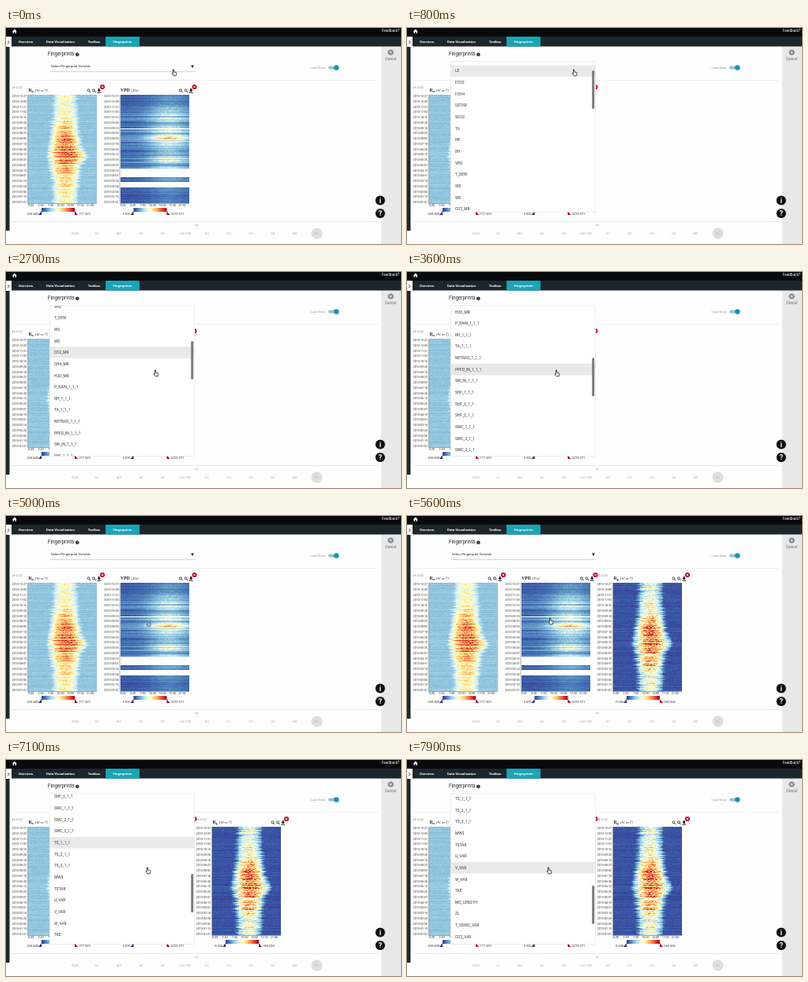
Recreate the animation shown at these times as an HTML page with a canvas. Size 500 by 275 pixels, loop 8 s.

```html
<!DOCTYPE html>
<html lang="en">
<head>
<meta charset="utf-8">
<title>Fingerprints</title>
<style>
html, body { margin: 0; width: 100%; height: 100%; overflow: hidden; background: #fff; }
canvas { display: block; width: 500px; height: 275px; }
</style>
</head>
<body>
<canvas id="stage" width="500" height="275"></canvas>
<script>
const ctx = document.getElementById('stage').getContext('2d');
const LOOP = 8000;
const SANS = 'Roboto, "Open Sans", sans-serif';
const SERIF = '"Liberation Serif", "Noto Serif", serif';
const RAMP = ['#313695', '#4575b4', '#74add1', '#abd9e9', '#e0f3f8', '#ffffbf',
  '#fee090', '#fdae61', '#f46d43', '#d73027', '#a50026'];
const ITEMS = ('LE FCO2 FCH4 USTAR SCO2 TA PR RH VPD T_DEW WS WD CO2_MR CH4_MR H2O_MR ' +
  'P_RAIN_1_1_1 RH_1_1_1 TA_1_1_1 NETRAD_1_1_1 PPFD_IN_1_1_1 SW_IN_1_1_1 ' +
  'SHF_1_1_1 SHF_2_1_1 SHF_3_1_1 SWC_1_1_1 SWC_2_1_1 SWC_3_1_1 TS_1_1_1 TS_2_1_1 TS_3_1_1 ' +
  'MWS TSTAR U_VAR V_VAR W_VAR TKE MO_LENGTH ZL T_SONIC_VAR CO2_VAR H2O_VAR CH4_VAR').split(' ');
const ROW = 14.65, LIST_TOP = 47.4;

// Drawing helpers
function rect(x, y, w, h, color) {
  ctx.fillStyle = color;
  ctx.fillRect(x, y, w, h);
}
function disc(x, y, r, color) {
  ctx.fillStyle = color;
  ctx.beginPath();
  ctx.arc(x, y, r, 0, 7);
  ctx.fill();
}
function poly(points, color) {
  ctx.fillStyle = color;
  ctx.beginPath();
  points.forEach(p => ctx.lineTo(...p));
  ctx.closePath();
  ctx.fill();
}
function line(points, color, width = 1) {
  ctx.strokeStyle = color;
  ctx.lineWidth = width;
  ctx.beginPath();
  points.forEach(([x, y], i) => i ? ctx.lineTo(x, y) : ctx.moveTo(x, y));
  ctx.stroke();
}
function text(str, x, y, size, color, align = 'left', weight = '', family = SANS) {
  ctx.font = `${weight} ${size}px ${family}`;
  ctx.textAlign = align;
  ctx.textBaseline = 'middle';
  ctx.fillStyle = color;
  ctx.fillText(str, x, y);
}
function cross(x, y, r, color, width) {
  line([[x - r, y - r], [x + r, y + r]], color, width);
  line([[x + r, y - r], [x - r, y + r]], color, width);
}

// Eased value at time t through [time, value] keys
function track(t, keys) {
  if (t <= keys[0][0]) return keys[0][1];
  for (let i = 1; i < keys.length; i++) {
    const [t0, a] = keys[i - 1], [t1, b] = keys[i];
    if (t < t1) {
      const u = (t - t0) / (t1 - t0);
      return a + (b - a) * u * u * (3 - 2 * u);
    }
  }
  return keys[keys.length - 1][1];
}

// Heatmaps
function random(seed) {
  return () => {
    seed = (seed * 1664525 + 1013904223) >>> 0;
    return seed / 4294967296;
  };
}
const bell = (x, mid, width) => Math.exp(-(((x - mid) / width) ** 2));
const rgb = RAMP.map(c => [1, 3, 5].map(i => parseInt(c.slice(i, i + 2), 16)));
function heatColor(v) {
  const p = Math.min(.999, Math.max(0, v)) * 10, i = Math.floor(p);
  return rgb[i].map((c, k) => c + (rgb[i + 1][k] - c) * (p - i));
}
function heatmap(seed, makeRow) {
  const map = document.createElement('canvas'), w = 48, h = 138;
  map.width = w;
  map.height = h;
  const g = map.getContext('2d'), image = g.createImageData(w, h), rnd = random(seed);
  for (let y = 0; y < h; y++) {
    const value = makeRow(y / h, rnd);
    for (let x = 0; x < w; x++) {
      const color = value ? heatColor(value(x / w)) : [255, 255, 255];
      image.data.set([...color, 255], (y * w + x) * 4);
    }
  }
  g.putImageData(image, 0, 0);
  return map;
}
function radiation(base, low, high) {
  return (d, rnd) => {
    const season = bell(d, .53, .28);
    const amp = (low + high * season) * (.58 + .47 * rnd());
    const mid = .53 + .03 * (rnd() - .5) + .03 * bell(d, .56, .06);
    const half = .16 + .07 * season + .05 * bell(d, .56, .06) + .05 * rnd();
    const night = base + .04 * (rnd() - .5);
    return u => night + .03 * rnd() +
      amp * Math.max(0, 1 - ((u - mid) / half) ** 2) * (.72 + .4 * rnd());
  };
}
function deficit(d, rnd) {
  if (d > .674 && d < .76 || d > .804 && d < .848 || Math.abs(d - .31) < .004) return null;
  const season = bell(d, .42, .27);
  const wave = .5 + .5 * Math.sin(d * 47 + 2 * Math.sin(d * 19));
  const night = .01 + .24 * season * (.3 + .7 * wave) * rnd() + .05 * rnd();
  const amp = .07 + season * (.2 + .4 * wave) * (.3 + .7 * rnd());
  return u => night + .03 * rnd() + amp * bell(u, .7, .29) * (.75 + .35 * rnd());
}
const CHARTS = [
  { x: 28, tag: '(1:1:1)', name: 'R', sub: 'n', unit: '[W m⁻²]', min: '-238.849', max: '717.269',
    map: heatmap(11, radiation(.24, .32, .38)) },
  { x: 144.5, tag: '', name: 'VPD', sub: '', unit: '[Pa]', min: '5.025', max: '6270.971',
    map: heatmap(5, deficit) },
  { x: 261, tag: '(1:1:1)', name: 'R', sub: 'g', unit: '[W m⁻²]', min: '0.056', max: '969.204',
    map: heatmap(29, radiation(.03, .55, .38)) }
];
const HOURS = ['0:00', '3:30', '7:00', '10:30', '14:00', '17:30', '21:00'];
const DATES = Array.from({ length: 21 }, (_, i) =>
  new Date(Date.UTC(2013, 11, 27) - i * 18 * 864e5).toISOString().slice(0, 10));

function drawChart({ x, tag, name, sub, unit, min, max, map }) {
  text(tag, x - 20, 76, 4.4, '#555', 'left', 'italic', SERIF);
  text(name, x + .5, 79.5, 5.6, '#222', 'left', 'bold', SERIF);
  const nameEnd = x + .5 + ctx.measureText(name).width;
  text(sub, nameEnd, 81, 4, '#222', 'left', 'bold', SERIF);
  text(unit, nameEnd + (sub ? 4 : 2), 79.5, 5, '#333', 'left', 'italic', SERIF);

  for (const dx of [76.5, 83]) {
    ctx.strokeStyle = '#222';
    ctx.lineWidth = .8;
    ctx.beginPath();
    ctx.arc(x + dx, 79.3, 1.5, 0, 7);
    ctx.stroke();
    line([[x + dx + 1, 80.4], [x + dx + 2.6, 82]], '#222', 1);
  }
  poly([[x + 88.8, 77], [x + 90.6, 77], [x + 90.6, 79], [x + 92, 79], [x + 89.7, 81.2],
    [x + 87.4, 79], [x + 88.8, 79]], '#111');
  rect(x + 87.4, 81.6, 4.6, 1, '#111');
  disc(x + 94, 75, 3.1, '#c3122b');
  cross(x + 94, 75, 1.1, '#fff', .8);

  ctx.imageSmoothingEnabled = false;
  ctx.drawImage(map, x, 85, 87, 138);
  line([[x - .5, 85], [x - .5, 223.5], [x + 87, 223.5]], '#555', .5);
  DATES.forEach((d, i) => text(d, x - 2, 87 + i * 6.75, 3.6, '#333', 'right'));
  HOURS.forEach((h, i) => text(h, x + 3.5 + i * 12.5, 226.2, 3.6, '#333', 'center'));

  const bar = ctx.createLinearGradient(x + 17, 0, x + 59, 0);
  RAMP.forEach((c, i) => bar.addColorStop(i / 10, c));
  rect(x + 17, 229, 42, 5, bar);
  poly([[x + 17, 233], [x + 17, 238], [x + 13, 238]], '#28327f');
  poly([[x + 59, 233], [x + 63, 238], [x + 59, 238]], '#a50026');
  text(min, x + 13, 236.5, 3.9, '#333', 'right');
  text(max, x + 64.5, 236.5, 3.9, '#333');
}

function drawFrame() {
  rect(0, 0, 500, 275, '#fefefe');
  rect(475, 23, 25, 252, '#e8e8e8');
  rect(0, 24, 4.5, 234, '#1c272d');
  rect(0, 0, 500, 11, '#07090b');
  rect(0, 11, 500, 12.5, '#1c272d');
  rect(126, 11, 43, 12.5, '#17a5b7');
  rect(0, 11, 7, 13, '#fff');
  line([[2.3, 16], [4.3, 18], [2.3, 20]], '#333', .9);
  poly([[7.8, 4.2], [10.8, 1.4], [13.8, 4.2], [13, 4.2], [13, 6.8], [11.5, 6.8], [11.5, 5],
    [10.1, 5], [10.1, 6.8], [8.6, 6.8], [8.6, 4.2]], '#fff');
  text('Feedback?', 498, 4, 4.7, '#fff', 'right');
  [['Overview', 25], ['Data Visualization', 69], ['Toolbox', 111.5], ['Fingerprints', 147.5]]
    .forEach(([s, x]) => text(s, x, 17.5, 4.4, '#fff', 'center', 'bold'));

  disc(487, 31, 3.6, '#858a91');
  cross(487, 31, 1.3, '#fff', .9);
  text('Cancel', 487, 40, 4.6, '#666', 'center');
  text('Fingerprints', 53, 33.5, 6.3, '#222');
  disc(90.3, 33.8, 2.3, '#222');
  text('i', 90.3, 34, 3.6, '#fff', 'center', 'bold');
  text('Load Data', 404, 50.5, 4.1, '#999', 'right');
  ctx.lineCap = 'round';
  line([[410, 50.5], [419, 50.5]], '#8bc6d8', 4);
  ctx.lineCap = 'butt';
  disc(418.3, 50.5, 3.2, '#1793b4');

  rect(8, 66, 463, .6, '#e8e8e8');
  rect(8, 246, 463, .6, '#dcdcdc');
  line([[239, 250], [241, 252], [243, 250]], '#888', .7);
  disc(393.5, 261.5, 7, '#dedede');
  'RAIN GC MH AV BG LM/TMI GC GC GD QD MS BC'.split(' ')
    .forEach((s, i) => text(s, 87.5 + i * 27.8, 261.5, 4.2, '#b4b4b4', 'center'));
}

function drawSelect() {
  text('Select Fingerprint Variable', 57, 49, 4.3, '#222');
  poly([[234, 47.5], [238, 47.5], [236, 51]], '#222');
  ctx.setLineDash([1, 1]);
  line([[56, 55.5], [239, 55.5]], '#888', .7);
  ctx.setLineDash([]);
}

// The list unrolls downwards while it fades in
function drawList(open, scroll, hover) {
  const height = 191 * (.5 + .5 * open);
  ctx.save();
  ctx.globalAlpha = open;
  ctx.strokeStyle = '#ddd';
  ctx.lineWidth = 1;
  ctx.strokeRect(55.5, 43, 183, height);
  rect(55.5, 43, 183, height, '#fff');
  ctx.beginPath();
  ctx.rect(55.5, 43, 183, height);
  ctx.clip();
  ITEMS.forEach((name, i) => {
    const y = LIST_TOP + i * ROW - scroll;
    if (y < 28 || y > 234) return;
    ctx.globalAlpha = i === hover ? Math.min(1, 2 * open) : open;
    if (i === hover) rect(55.5, y, 183, ROW, '#e9e9e9');
    text(name, 61, y + ROW / 2 + .3, 4.8, '#333');
  });
  ctx.globalAlpha = open ** 3;
  ctx.lineCap = 'round';
  const thumb = 55.5 + scroll * .264;
  line([[235.7, thumb], [235.7, thumb + 46]], '#7b7b7b', 3);
  ctx.restore();
}

function drawHand(x, y) {
  ctx.save();
  ctx.translate(x, y);
  ctx.lineJoin = 'round';
  const hand = [[-1.6, -3.8], [-.4, -3.8], [-.2, -1], [2.6, -.3], [3, .8], [2.2, 3.8],
    [-1, 3.8], [-3, .8], [-2.4, .2], [-1.5, 1]];
  poly(hand, '#fff');
  line([...hand, hand[0], hand[1]], '#222', .8);
  ctx.restore();
}

// Motion
const pointer = t => [
  track(t, [[700, 213], [1600, 190], [3700, 190], [4150, 181], [5500, 181], [6050, 193],
    [6500, 193], [7000, 180]]),
  track(t, [[1000, 57], [1400, 88], [1600, 129], [3700, 129], [4150, 142], [5500, 142], [6050, 53],
    [6500, 53], [7000, 141]])
];
const scrollAt = t => t < 5000
  ? track(t, [[1900, 0], [2500, 105], [2700, 128], [3500, 209]])
  : track(t, [[6700, 297], [7100, 345], [7600, 401]]);
const hoverAt = t => Math.floor((pointer(t)[1] - 4 + scrollAt(t) - LIST_TOP) / ROW);

function draw(t) {
  const open = track(t, [[600, 0], [800, 1], [4200, 1], [4400, 0], [6200, 0], [6400, 1]]);
  drawFrame();
  if (open === 0 || t < 5000) drawSelect();
  CHARTS.slice(0, t < 5600 ? 2 : 3).forEach(drawChart);
  if (open > 0) drawList(open, scrollAt(t), hoverAt(t - 200));

  [['i', 219.5], ['?', 236]].forEach(([s, y]) => {
    disc(473.7, y, 6.1, '#0b0d0e');
    text(s, 473.7, y + .5, 9, '#fff', 'center', 'bold');
  });

  const [x, y] = pointer(t);
  if (t > 4400 && t < 5600) {
    disc(x, y - 4, 2.6, '#444');
    disc(x, y - 4, 1.7, '#fff');
    disc(x, y - 4, .7, '#444');
  } else {
    drawHand(x, y);
  }
}

const start = performance.now();
function tick() {
  draw((performance.now() - start) % LOOP);
  requestAnimationFrame(tick);
}
tick();
</script>
</body>
</html>
```
